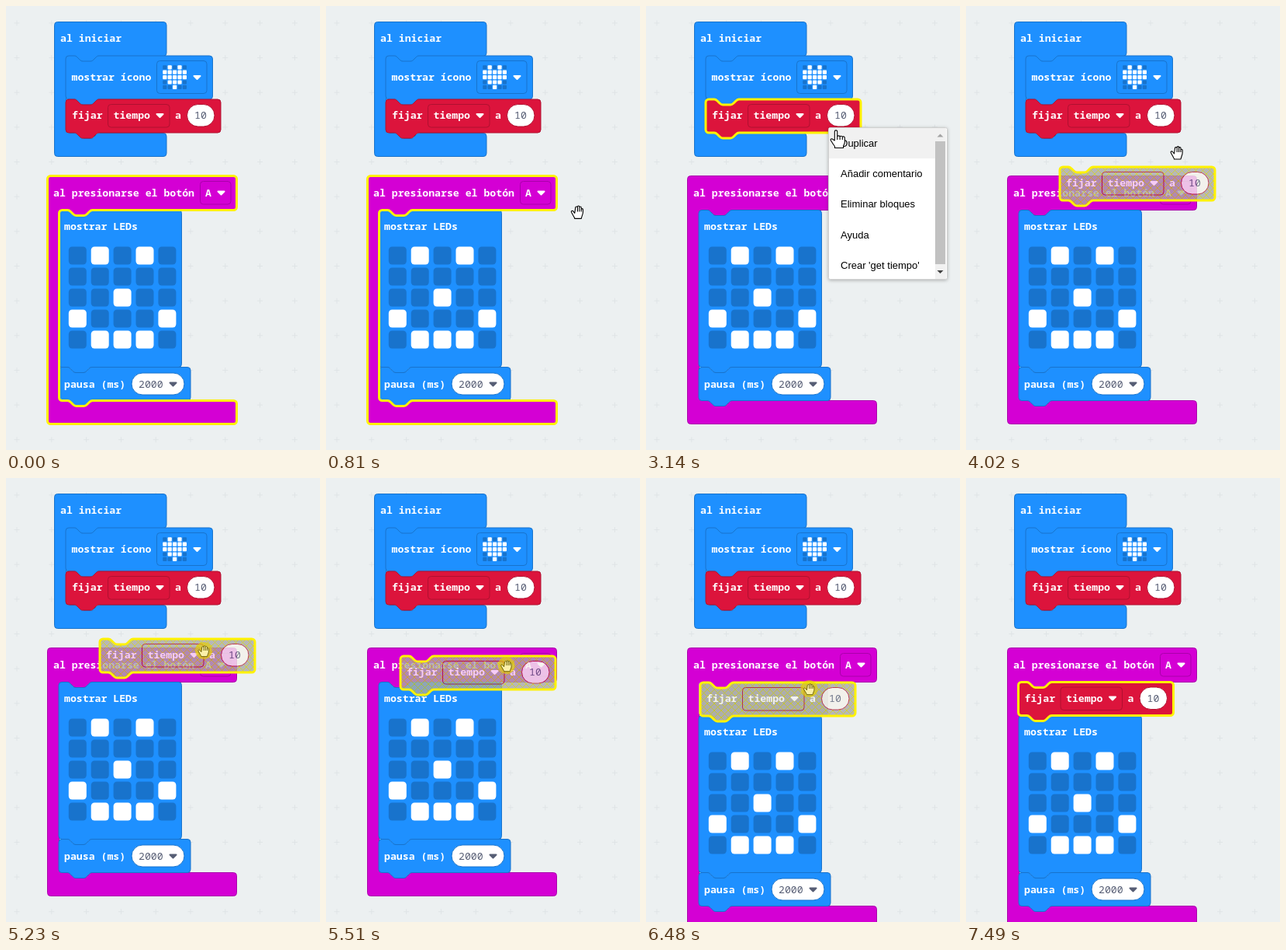
An HTML page for the animation above (9010 ms loop, 405 by 571 pixels).

```html
<!DOCTYPE html>
<html lang="es">
<head>
<meta charset="utf-8">
<title>Duplicar un bloque</title>
<style>
  html, body { margin: 0; width: 100%; height: 100%; overflow: hidden; background: #ecf0f1; }
  svg { display: block; }
  text { font: 700 13.2px "Noto Sans Mono", monospace; fill: #fff; white-space: pre; }
  text.value { font-weight: 500; fill: #575e75; }
  .blue { fill: #1e90ff; stroke: #1873cc; }
  .red { fill: #dc143c; stroke: #b01030; }
  .pink { fill: #d400d4; stroke: #aa00aa; }
  .field { fill: none; }
  .oval { fill: #fff; }
  .orphan { opacity: .8; }
  .orphan > .red:first-child { fill: url(#hatch); stroke: none; }
  .orphan .oval { fill: #f4f2ec; }
  #glow { fill: none; stroke: #fff200; stroke-width: 3; stroke-linejoin: round; }
  #menu text { font: 13px "Liberation Sans", Arial, sans-serif; fill: #000; }
  .cursor { fill: #fff; stroke: #000; stroke-width: 1.1; stroke-linejoin: round; }
</style>
</head>
<body>
<svg id="stage" width="405" height="571" viewBox="0 0 405 571"></svg>
<script>
const LOOP = 9010, ROW = 43;
const NOTCH = 'c2 0 3 1 4 2l3 3c1 1 2 2 4 2h10c2 0 3-1 4-2l3-3c1-1 2-2 4-2';
const NOTCH_BACK = 'c-2 0-3 1-4 2l-3 3c-1 1-2 2-4 2h-10c-2 0-3-1-4-2l-3-3c-1-1-2-2-4-2';

// Outline of a plain statement block
const statement = (w, h) =>
  `M0 4a4 4 0 0 1 4-4h7${NOTCH}H${w - 4}a4 4 0 0 1 4 4V${h - 4}a4 4 0 0 1-4 4H43${NOTCH_BACK}H4a4 4 0 0 1-4-4z`;

// Outline of an event block wrapped around a body of the given height
const wrapper = (w, body) =>
  `M0 4a4 4 0 0 1 4-4H${w - 4}a4 4 0 0 1 4 4V40a4 4 0 0 1-4 4H58${NOTCH_BACK}H19a4 4 0 0 0-4 4v${body - 8}` +
  `a4 4 0 0 0 4 4h7${NOTCH}H${w - 4}a4 4 0 0 1 4 4v22a4 4 0 0 1-4 4H4a4 4 0 0 1-4-4z`;

const group = (x, y, content, id = '') => `<g ${id && `id="${id}"`} transform="translate(${x} ${y})">${content}</g>`;
const shape = (d, cls) => `<path class="${cls}" d="${d}"/>`;
const label = (x, y, text, cls = '') => `<text x="${x}" y="${y}" class="${cls}">${text}</text>`;
const box = (x, y, w, h, r, attrs) => `<rect x="${x}" y="${y}" width="${w}" height="${h}" rx="${r}" ${attrs}/>`;
const arrow = (x, y, color = '#fff') =>
  `<path d="M${x - 4} ${y - 2}h8l-4 4z" fill="${color}" stroke="${color}" stroke-width="2" stroke-linejoin="round"/>`;
const leds = (rows, x, y, dx, dy, size, r) => rows.split(' ').map((row, j) => [...row].map((c, i) =>
  box(x + i * dx, y + j * dy, size, size, r, `fill="${c === '#' ? '#fff' : '#1873cc'}"`)).join('')).join('');

const RED = statement(200, ROW);
const setBlock = shape(RED, 'red') + label(8, 25, 'fijar') +
  box(54.5, 6.5, 79.5, 29.5, 4, 'class="red field"') + label(61.5, 25, 'tiempo') + arrow(121.5, 21) +
  label(141, 25, 'a') + box(156.5, 6.5, 35.5, 28.5, 14.2, 'class="red oval"') + label(166, 25, '10', 'value');

const startBlock = group(62.5, 20.5, shape(wrapper(144.5, 99), 'blue') + label(7.5, 25.5, 'al iniciar')) +
  group(77, 64, shape(statement(189.5, 56), 'blue') + label(7.5, 32, 'mostrar ícono') +
    box(117.5, 6.5, 64.5, 42, 4, 'class="blue field"') +
    leds('.#.#. ##### ##### .###. ..#..', 125.2, 12.2, 6.4, 6.4, 5.2, 1) + arrow(169.5, 28)) +
  group(77, 120, setBlock);

const buttonBody = group(0, 0,
  group(68, 262.5, shape(statement(158.5, 202), 'blue') + label(7, 25.5, 'mostrar LEDs') +
    leds('.#.#. ..... ..#.. #...# .###.', 12.8, 47, 28.9, 27, 23, 4.5)) +
  group(68, 464.5, shape(statement(170, ROW), 'blue') + label(7, 26.5, 'pausa (ms)') +
    box(94, 7.5, 68, 28, 14, 'class="blue oval"') + label(103, 26.5, '2000', 'value') + arrow(147.5, 22, '#575e75')),
  'body');

const menu = '<g id="menu">' +
  box(235.5, 156.5, 153, 195, 2, 'fill="#fff" stroke="#d0d0d0" style="filter:drop-shadow(0 1px 2px #0004)"') +
  box(236, 157, 137, 39, 0, 'fill="#f1f1f1"') + box(373, 157, 14, 194, 0, 'fill="#f1f1f1"') +
  box(373, 174, 13, 158, 0, 'fill="#c1c1c1"') +
  '<path d="M375.5 168.5h8l-4-4z" fill="#a3a3a3"/><path d="M375.5 340h8l-4 4z" fill="#404040"/>' +
  ['Duplicar', 'Añadir comentario', 'Eliminar bloques', 'Ayuda', "Crear 'get tiempo'"]
    .map((item, i) => label(251, 181 + i * 39.2, item)).join('') + '</g>';

const hand = 'M-3.5 2-5.5-.5c-1-1.3-3-.3-2.2 1.3L-4 7.5c.4.6.5 1 .5 1.5H5c.2-1 .5-2 1-3.5.8-2 1.2-3 1.2-5v-3.2' +
  'c0-1.5-2.2-1.5-2.2 0v-2.5c0-1.6-2.4-1.6-2.4 0v-1c0-1.6-2.4-1.6-2.4 0v1c0-1.6-2.9-1.5-2.7.2z' +
  'M5-2.7V0M2.6-5.2V0M.2-5.2V0';
const finger = 'M-1.7 13V1.5c0-2.2 3.4-2.2 3.4 0V8c0-1.5 3.4-1.5 3.4.3 0-1.6 3.2-1.4 3.2.5 0-1.4 3-1.2 3 .6V15' +
  'c0 2-1 3.5-1.8 5v2.5h-11v-2c-2-2.2-3.2-4.5-5-7.5-1-2 1-3 2.5-1.5zM1.7 8v4M5.1 8.3V12M8.3 8.8V12';

const stage = document.getElementById('stage');
stage.innerHTML = `<defs>
  <pattern id="dots" x="-8.4" y="-.4" width="44.8" height="44.65" patternUnits="userSpaceOnUse">
    <path d="M18.9 22.4h7M22.4 18.9v7" stroke="#dfe4e6"/></pattern>
  <pattern id="hatch" width="9" height="9" patternUnits="userSpaceOnUse">
    <path d="M0 0h9v9H0z" fill="#aaa"/><path d="M0 0l9 9M9 0L0 9" stroke="#cc0" stroke-width=".9"/></pattern></defs>
  <rect width="405" height="571" fill="url(#dots)"/>` + startBlock +
  group(53.5, 218.5, '<path id="event" class="pink"/>' + label(7.5, 26.5, 'al presionarse el botón') +
    box(197, 7, 39.5, 29.5, 4, 'class="pink field"') + label(203.5, 26.5, 'A') + arrow(224, 22)) +
  buttonBody + group(68, 262.5, `<path id="marker" d="${statement(167, ROW)}" fill="#bbb"/>`) +
  group(0, 0, setBlock, 'copy') + '<path id="glow"/>' + menu +
  group(0, 0, '<circle id="halo" r="11" fill="#e6cf00" opacity=".65"/>' +
    shape(hand, 'cursor').replace('<path', '<path id="hand"') +
    shape(finger, 'cursor').replace('<path', '<path id="finger"'), 'pointer');

const part = Object.fromEntries([...stage.querySelectorAll('[id]')].map(el => [el.id, el]));
const show = (el, on) => el.setAttribute('visibility', on ? 'visible' : 'hidden');
const move = (el, [x, y]) => el.setAttribute('transform', `translate(${x} ${y})`);

// Eased position on a list of [time, x, y] stops
function along(stops, t) {
  const next = stops.findIndex(s => s[0] > t);
  if (next < 1) return (next ? stops[stops.length - 1] : stops[0]).slice(1);
  const [t0, x0, y0] = stops[next - 1], [t1, x1, y1] = stops[next];
  const u = (t - t0) / (t1 - t0), k = u * u * (3 - 2 * u);
  return [x0 + (x1 - x0) * k, y0 + (y1 - y0) * k];
}

const pointerStops = [
  [70, 332, 540], [270, 368, 330], [540, 368, 330], [1210, 246, 147], [1350, 235, 157], [1760, 235, 157],
  [2270, 234.5, 156], [2540, 234.5, 156], [2610, 235, 152], [3070, 235, 152], [3140, 245, 160], [3270, 287, 176],
  [3410, 266, 168], [3670, 266, 168], [3800, 270, 178], [3950, 270, 178], [4020, 272, 188], [4350, 272, 188],
  [5160, 255, 222], [5230, 255, 222], [5800, 209.5, 261], [6340, 209.5, 261], [6480, 210.5, 271],
  [7010, 210.5, 271], [7420, 326, 294]];
const copyStops = [[5230, 121, 207], [5800, 70, 252], [6340, 70, 252], [6480, 70, 263]];

function render(t) {
  const menuOpen = t >= 2540 && t < 3950, copied = t >= 4020, inserted = t >= 5650, dropped = t >= 7010;
  const pressed = t >= 5160 && !dropped, pointing = t >= 2610 && t < 3950;
  const eventShape = wrapper(244, inserted ? 245 + ROW : 245);
  const copyAt = dropped ? [67.5, 262.5] : along(copyStops, t);

  part.event.setAttribute('d', eventShape);
  move(part.body, [0, inserted ? ROW : 0]);
  show(part.marker, inserted && !dropped);
  show(part.copy, copied);
  move(part.copy, copyAt);
  part.copy.classList.toggle('orphan', !dropped);

  part.glow.setAttribute('d', t < 2470 ? eventShape : RED);
  move(part.glow, t < 2470 ? [53.5, 218.5] : copied ? copyAt : [77, 120]);

  show(part.menu, menuOpen);
  const visible = t >= 70 && t < 7490;
  move(part.pointer, along(pointerStops, t));
  show(part.halo, pressed);
  show(part.hand, visible && !pointing);
  show(part.finger, visible && pointing);
  part.hand.setAttribute('transform', pressed ? 'scale(.9 .85)' : 'scale(1)');
  part.hand.style.fill = pressed ? '#fbf0a8' : '';
  part.hand.style.stroke = pressed ? '#6b6000' : '';
}

const start = performance.now();
function tick() {
  render((performance.now() - start) % LOOP);
  requestAnimationFrame(tick);
}
tick();
</script>
</body>
</html>
```
